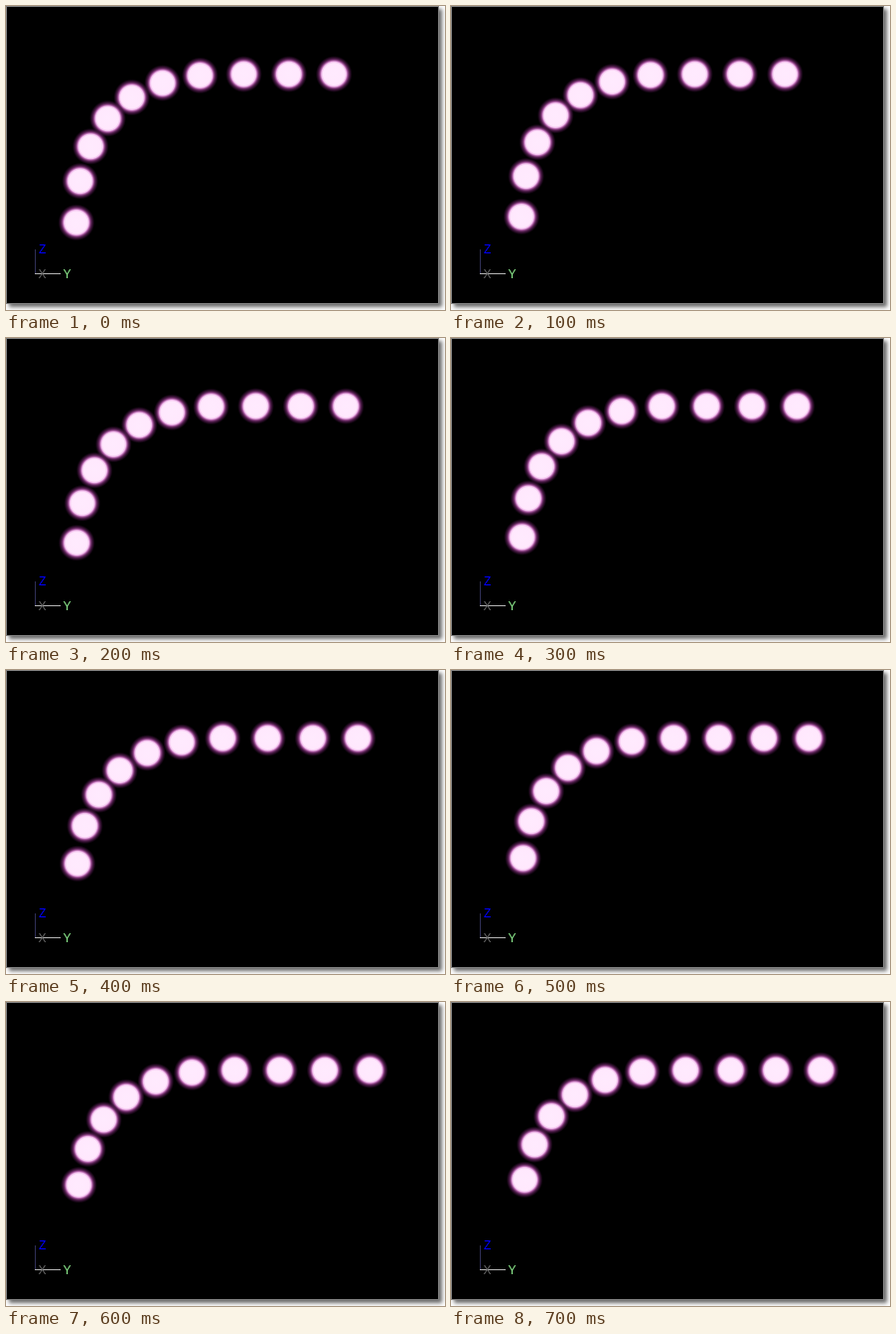
These frames come from a looping animation (442 px wide and 306 px high, 800 ms). An HTML page:

```html
<!DOCTYPE html>
<html lang="en">
<head>
<meta charset="utf-8">
<title>Beads on a curve</title>
<style>
html, body { margin: 0; width: 100%; height: 100%; overflow: hidden; background: #fff; }
#view {
  position: absolute; left: 0; top: 0; width: 436px; height: 300px;
  background: #000; box-shadow: 3px 3px 4px rgba(0, 0, 0, .6);
}
svg { display: block; }
text { font: 12px "Liberation Sans", Arial, sans-serif; text-anchor: middle; }
</style>
</head>
<body>
<div id="view">
<svg width="436" height="300" viewBox="0 0 436 300">
  <defs>
    <radialGradient id="glow" gradientUnits="userSpaceOnUse" cx="0" cy="0" r="18.5">
      <stop offset="0" stop-color="#ffeafe"/>
      <stop offset=".59" stop-color="#ffe8fd"/>
      <stop offset=".67" stop-color="#f3bfee"/>
      <stop offset=".74" stop-color="#a85aa0"/>
      <stop offset=".81" stop-color="#6e2c68" stop-opacity=".85"/>
      <stop offset=".9" stop-color="#50184c" stop-opacity=".5"/>
      <stop offset="1" stop-color="#300c2e" stop-opacity="0"/>
    </radialGradient>
  </defs>
  <rect x=".5" y=".5" width="435" height="299" fill="none" stroke="#808080"/>
  <g id="beads"></g>
  <g shape-rendering="crispEdges">
    <path d="M29.5 245V269" stroke="#303058"/>
    <path d="M29 269.5H55" stroke="#b4b4b4"/>
  </g>
  <text x="36.7" y="249" fill="#0000ff">Z</text>
  <text x="36.5" y="273.5" fill="#666">X</text>
  <text x="61.5" y="273.5" fill="#90f090">Y</text>
</svg>
</div>
<script>
const COUNT = 10, GAP = 45.4, STEP = 6.04;
const LEAD = 330.2, BEND = 222.4, TOP = 68.6;
const LOOP = 800, TICK = 100;

const group = document.getElementById("beads");
const beads = Array.from({ length: COUNT }, () => {
  const dot = document.createElementNS("http://www.w3.org/2000/svg", "circle");
  dot.setAttribute("r", 18.5);
  dot.setAttribute("fill", "url(#glow)");
  return group.appendChild(dot);
});

// Straight along the top, parabolic below the bend.
function place(s) {
  const w = Math.max(0, BEND - s) / GAP;
  const drop = 3.4 * w * w;
  return [s + drop, TOP + drop];
}

function draw(time) {
  const step = Math.floor((time % LOOP) / TICK);
  beads.forEach((dot, i) => {
    const [x, y] = place(LEAD + step * STEP - i * GAP);
    dot.setAttribute("transform", `translate(${x.toFixed(2)} ${y.toFixed(2)})`);
  });
}

const start = performance.now();
function tick() {
  draw(performance.now() - start);
  requestAnimationFrame(tick);
}
tick();
</script>
</body>
</html>
```
